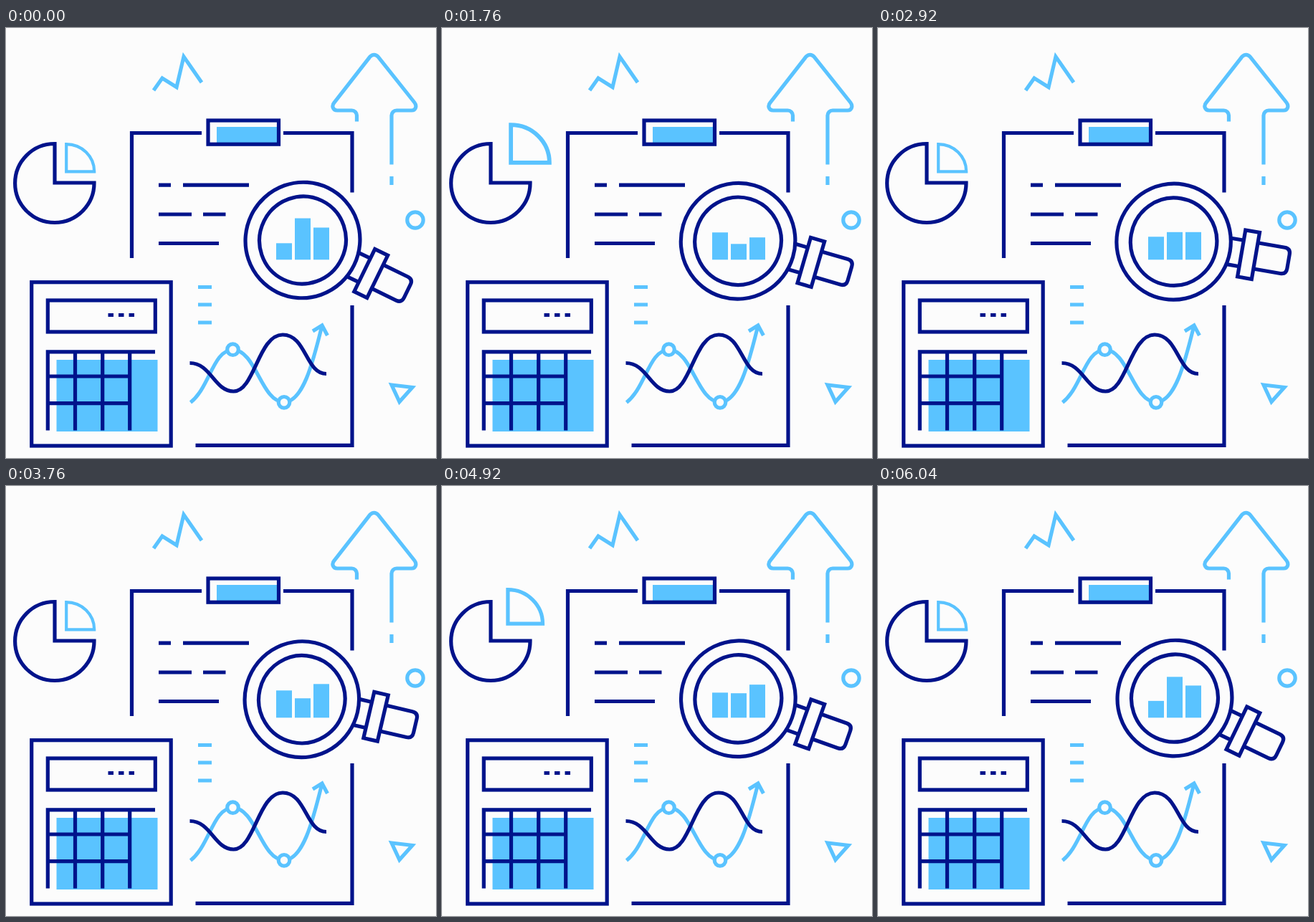
An HTML page for the animation above (6080 ms loop, 600 by 600 pixels).

```html
<!DOCTYPE html>
<html lang="en">
<head>
<meta charset="utf-8">
<title>Analytics illustration</title>
<style>
  html, body { margin: 0; width: 100%; height: 100%; overflow: hidden; background: #fcfcfc; }
  svg { display: block; width: 100vw; height: 100vh; }
  .navy { fill: none; stroke: #00138b; stroke-width: 5.2; }
  .sky { fill: none; stroke: #5ac3ff; stroke-width: 5.2; }
  .fill { fill: #5ac3ff; }
  .knob { fill: #fcfcfc; }
</style>
</head>
<body>
<svg viewBox="0 0 600 600">
  <!-- loose decorations -->
  <g class="sky">
    <path d="M206 87 L218 70 L238 82.5 L248 40 L273 76"/>
    <path d="M489.5 130.5 V122 A7 7 0 0 0 482.5 115 H462 C456 115 454 108.5 458 104 L508 40 C511 36.5 516 36.5 519 40 L570 104 C573.5 108.5 572 115 566 115 H545 A7 7 0 0 0 538 122 V190.5 M538 207 V219"/>
    <circle cx="571" cy="268" r="11.2"/>
    <path d="M538 498 L567 501.5 L549 521.5 Z"/>
    <path d="M268 361.5 H287 M268 386 H287 M268 411 H287"/>
  </g>

  <!-- pie -->
  <path class="navy" d="M68 161.5 A55.2 55 0 1 0 123 216 H68 Z"/>
  <path id="slice" class="sky" style="stroke-width:4.2" d="M0 0 V-38.2 A39 38.2 0 0 1 39 0 Z"/>

  <!-- clipboard -->
  <rect class="fill" x="294" y="138" width="86" height="24"/>
  <g class="navy">
    <rect x="282" y="129" width="98.5" height="33.2"/>
    <path d="M273 146.5 H175.5 V321 M387 146.5 H483 V229.5 M483 387 V582.3 H264.5"/>
    <path d="M213 219.2 H230 M247 219.2 H339 M213 260 H259 M275 260 H306.5 M213 300.5 H297"/>
  </g>

  <!-- calculator -->
  <rect class="fill" x="70.5" y="463" width="141" height="100"/>
  <g class="navy">
    <rect x="35.7" y="354.7" width="194.5" height="228.3"/>
    <rect x="58.3" y="380" width="150" height="44"/>
    <path d="M142.5 400.5 H150 M157 400.5 H164.5 M171.5 400.5 H179"/>
    <path d="M208 451.8 H58.3 V561.5 M96.5 452 V561.5 M134.7 452 V561.5 M172.7 452 V561.5 M58 486 H172.7 M58 523.7 H172.7"/>
  </g>

  <!-- line chart -->
  <g class="sky">
    <path d="M257.5 522.5 C284 502 289 449 316.5 449 C349 449 356 522 388 522 C414 522 428 468 440.5 417"/>
    <path d="M428 423 L441 415 L448.5 429"/>
    <circle class="knob" cx="316.5" cy="448.7" r="7.8"/>
    <circle class="knob" cx="388" cy="522.3" r="7.8"/>
  </g>
  <path class="navy" d="M256.5 467.5 C286 467.5 291 507 317.5 507 C347 507 352 428 386 428 C419 428 418 482.5 447 482.5"/>

  <!-- bars and magnifier -->
  <g id="bars" class="fill">
    <rect x="377" width="22"/>
    <rect x="403" width="22"/>
    <rect x="429" width="22"/>
  </g>
  <g id="glass" class="navy">
    <ellipse rx="79.7" ry="81"/>
    <ellipse rx="60.2" ry="61.2"/>
    <path d="M78 -18.5 H96 M78 18.5 H96"/>
    <rect x="96" y="-33" width="20" height="66"/>
    <path d="M116 -18.4 H154 Q162.3 -18.4 162.3 -10 V10 Q162.3 18.4 154 18.4 H116"/>
  </g>
</svg>
<script>
  const LOOP = 6080, STEP = 40, BASE = 323.3;
  const slice = document.getElementById('slice');
  const glass = document.getElementById('glass');
  const bars = [...document.getElementById('bars').children];

  // Bar heights as [ms, height] keys, joined by straight segments
  const heights = [
    [[0, 23], [1110, 41.4], [3040, 31.4], [4220, 42.2], [LOOP, 23]],
    [[0, 57.8], [1353, 16.2], [3040, 40.2], [4190, 19.2], [LOOP, 57.8]],
    [[0, 44.8], [2000, 29.2], [3800, 47.4], [LOOP, 44.8]]
  ];

  const mix = (a, b, k) => a + (b - a) * k;
  const pulse = (t, peak, half) => Math.max(0, 1 - Math.abs(t - peak) / half);

  function track(keys, t) {
    const i = keys.findIndex(key => key[0] > t);
    const [t0, a] = keys[i - 1], [t1, b] = keys[i];
    return mix(a, b, (t - t0) / (t1 - t0));
  }

  function draw(t) {
    const angle = mix(9.1, 26, Math.abs(1 - 2 * t / LOOP));
    glass.setAttribute('transform',
      `rotate(${angle - 26} 421 302) translate(414 296) rotate(26)`);

    const grow = pulse(t, 1800, 750) + pulse(t, 4630, 750);
    slice.setAttribute('transform',
      `translate(${mix(84.2, 96.8, grow)} ${mix(200.3, 187.1, grow)}) scale(${mix(1, 1.4, grow)})`);

    bars.forEach((bar, i) => {
      const h = track(heights[i], t);
      bar.setAttribute('y', BASE - h);
      bar.setAttribute('height', h);
    });
  }

  const start = performance.now();
  function tick() {
    const t = (performance.now() - start) % LOOP;
    draw(Math.floor(t / STEP) * STEP);
    requestAnimationFrame(tick);
  }
  draw(0);
  requestAnimationFrame(tick);
</script>
</body>
</html>
```
